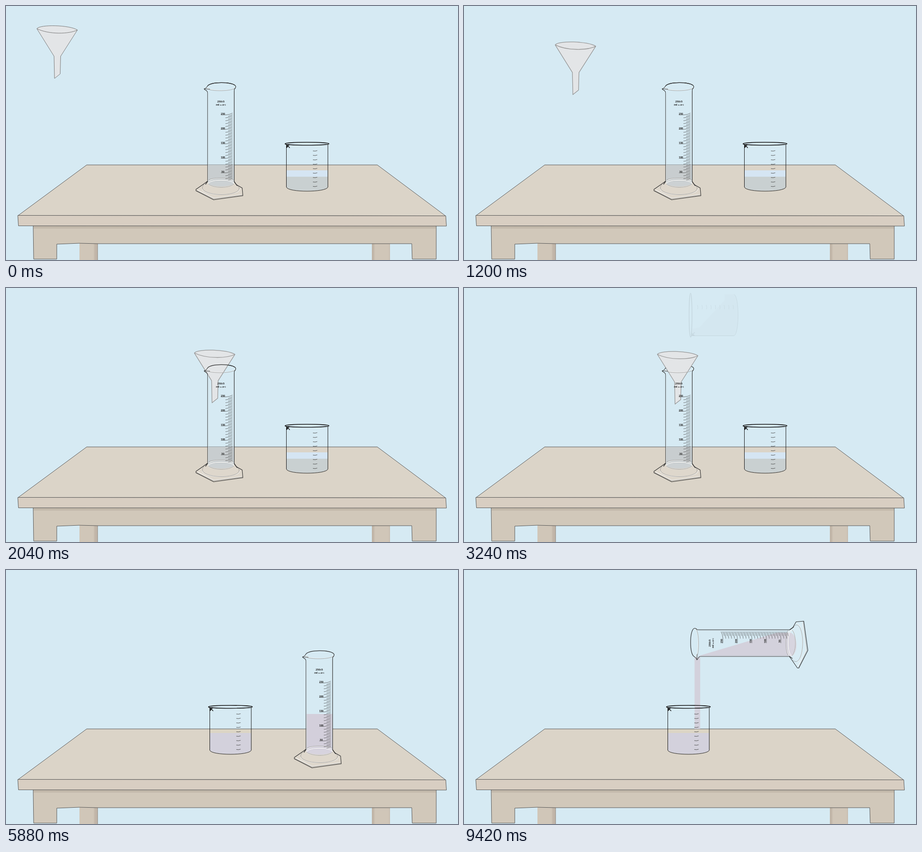
Animation, 997 px wide and 561 px high, one loop 9930 ms. Source, as an HTML page:

```html
<!DOCTYPE html>
<html lang="en">
<head>
<meta charset="utf-8">
<title>Measuring a liquid</title>
<style>
html, body { margin: 0; width: 100%; height: 100%; overflow: hidden; background: #d6eaf3; }
svg { display: block; width: 100vw; height: 100vh; }
text { font-family: "Open Sans", "Noto Sans", sans-serif; font-weight: 700; fill: #222; text-anchor: middle; }
</style>
</head>
<body>
<svg viewBox="0 0 997 561" fill="none" stroke-linejoin="round">
  <defs>
    <path id="arc" d="M445 176C454 167.3 494 167.3 505 175" stroke="#2a2a2a" stroke-width="1.2"/>

    <g id="cylinder">
      <path d="M419 405L437 392L445 388L503.500 388L521 402L522.500 419L458 428L419 408Z" fill="#fff" fill-opacity=".08"/>
      <g stroke="#f4f4f2" stroke-width="1.1">
        <ellipse cx="474.500" cy="392.500" rx="28" ry="8"/>
        <path d="M447 387C455 377.500 494 377.500 502 387M446 391C455 383 494 383 503 391"/>
        <path d="M433 404C434 420 514 421 516 404M423 406.500L458 424.500L519 416.500"/>
        <path d="M441 180C452 188 498 188.500 505 180"/>
      </g>
      <g stroke="#777" stroke-width=".6">
        <path d="M437 394C424 407 446 416 474 416.500S526 407 508 395"/>
        <path d="M446 393C456 403 494 403 503 393M447 384.500C456 378 493 378 502 384.500"/>
        <path d="M420 407.500L458 425.800L521.500 417.500"/>
        <path d="M442 182.500C453 189 499 188.500 505 181"/>
        <path d="M446.500 192V388M501.800 188V388" stroke="#c3ced3"/>
      </g>
      <g stroke="#2a2a2a" stroke-width="1.1">
        <path d="M445 176C443 179.500 441 182.500 437 183C438 186.500 444 185 444.500 191"/>
        <path d="M444.500 191V387" stroke="#444" stroke-width="1"/>
        <path d="M444.500 387L437 392.500L419 405V408L458 428L522.500 419L521 402L508 394.500L503.500 388V184"/>
        <path d="M503.500 184C507 181 508 177.500 505 175"/>
        <path d="M437 183C443 184 448 182.500 450 184" stroke-width=".8"/>
        <path d="M445 387L440 394M503.500 388L510 397" stroke-width="1.300"/>
      </g>
      <path id="scale" stroke="#444" stroke-width=".7"/>
      <g id="labels" font-size="5.500"></g>
      <text x="474" y="213.300" font-size="5.600">250±5</text>
      <text x="474" y="220" font-size="5.200">mℓ <tspan font-size="3.800">in 20°C</tspan></text>
    </g>

    <g id="beaker" stroke="#111">
      <g id="vessel">
        <path d="M618.500 306V400" stroke-width="1"/>
        <path d="M618.500 400C622 412 706 412 710 400" stroke-width=".9"/>
        <ellipse cx="664" cy="304.200" rx="48.500" ry="3.200" stroke-width="1.500"/>
        <path d="M615 304.500L620 307L619.500 312.500L622 309L626 313.500M620 308L625 307" stroke-width="1.300"/>
        <path id="marks" stroke="#444" stroke-width=".9"/>
      </g>
      <path d="M710 306V400" stroke-width="1"/>
    </g>

    <linearGradient id="legL"><stop offset=".76" stop-color="#d0c6b8"/><stop offset=".86" stop-color="#c1b5a8"/></linearGradient>
    <linearGradient id="legR"><stop offset=".08" stop-color="#c0b4a6"/><stop offset=".18" stop-color="#d0c6b8"/><stop offset=".92" stop-color="#d0c6b8"/><stop offset="1" stop-color="#c4b9ab"/></linearGradient>
  </defs>

  <rect width="997" height="561" fill="#d6eaf3"/>

  <g stroke="#555" stroke-width="1">
    <path d="M162 524H202V561H162Z" fill="url(#legL)" stroke="none"/>
    <path d="M807 524H847V561H807Z" fill="url(#legR)" stroke="none"/>
    <path d="M202 525V561" stroke="#8b8178"/>
    <path d="M60 486H949V559H896L895 525H202L162 524L112 526V559H61Z" fill="#d1c8ba"/>
    <path d="M61 486H948V491.500H61Z" fill="#c2b8aa" stroke="none"/>
    <path d="M178 351H819L969.500 463.500L27 462.500Z" fill="#dbd4c8"/>
    <path d="M26 462.500L970 463.500L971.500 486L27.500 485.500Z" fill="#d8cec2"/>
  </g>

  <g id="sceneA">
    <path d="M445.500 351H503V392C495 401 454 401 445.500 392Z" fill="#c8cdcf"/>
    <use href="#arc"/>
    <g id="funnel" fill="#e3e5e7">
      <path d="M68 50C75 40.500 140 41.500 157.500 53L120.500 111L119.500 150L107 160L106 111Z"/>
      <path d="M157.500 53C140 62 95 63.500 68 50" fill="none"/>
    </g>
    <path id="pool" d="M438 165H506L498.500 177H445.500Z" fill="#e3ebe4"/>
    <use href="#cylinder"/>
    <use id="rim" href="#arc"/>
    <path id="drip" d="M465.500 254L475 250V388H465.500Z" fill="#c9d2d3"/>

    <path d="M619 363H709.500V377H619Z" fill="#d5e5f3"/>
    <path d="M619 377H709.500V400C705 411 623 411 619 400Z" fill="#c9d0d1"/>
    <use href="#beaker"/>

    <g id="tilted">
      <path d="M575 14H595C607 20 607 102 595 106H503V90L519 87L575 27Z" fill="#c9d0d2"/>
      <use href="#vessel" stroke="#111" transform="matrix(0 -1 1 0 195.500 724)"/>
    </g>
    <path id="pour" d="M496 105H504V157H496Z" fill="#c9d2d3"/>
  </g>

  <g id="sceneB">
    <path id="stream" d="M508.500 193H521V351H508.500Z" fill="#d3d1dc"/>
    <g transform="translate(-169 -2)">
      <path d="M619 354H710V362H619Z" fill="#dcd5c5"/>
      <path d="M619 362H710V400C705 411 623 411 619 400Z" fill="#d3d1dc"/>
      <use href="#beaker"/>
    </g>
    <g id="filled" transform="translate(217 9)">
      <path d="M445.500 309H503V392C495 401 454 401 445.500 392Z" fill="#d3cfdb"/>
      <use href="#cylinder"/><use href="#arc"/>
    </g>
    <path id="liquid" d="M515 190.500L690 138.500H721C737 146 737 183 723 190.500Z" fill="#d3d1dc"/>
    <g id="lying" transform="matrix(0 -1 1 0 330.500 635.500)">
      <use href="#cylinder"/><use href="#arc"/>
    </g>
  </g>
</svg>
<script>
const LOOP = 9930, STEP = 30;
const el = {};
document.querySelectorAll('[id]').forEach(e => { el[e.id] = e; });

// Graduations of the cylinder, one per 5 ml
let d = '', labels = '';
for (let k = 0; k < 46; k++) {
  const y = 240.5 + k * 3.2;
  const x = k % 10 === 0 ? 474 : k % 2 === 0 ? 484 : 490;
  d += `M${x} ${y}H${Math.max(x, 485)}Q494 ${y - 0.5} 499.5 ${y - 4}`;
  if (k % 10 === 0) labels += `<text x="478.500" y="${y - 1}">${250 - k * 5}</text>`;
}
el.scale.setAttribute('d', d);
el.labels.innerHTML = labels;

d = '';
for (let i = 0; i < 9; i++) d += `M677 ${320 + i * 9.8}q5 1.200 9.500 -.6`;
el.marks.setAttribute('d', d);

const clamp = v => Math.min(1, Math.max(0, v));
const ramp = (t, a, b) => clamp((t - a) / (b - a));
const show = (e, on) => e.setAttribute('visibility', on ? 'visible' : 'hidden');
const fade = (e, v) => e.setAttribute('opacity', v);

// Speeds up over share a, runs evenly, slows down over share b
function glide(u, a, b) {
  const v = 1 / (1 - (a + b) / 2);
  if (u < a) return v * u * u / (2 * a);
  if (u > 1 - b) return 1 - v * (1 - u) ** 2 / (2 * b);
  return v * (u - a / 2);
}

function draw(ms) {
  const t = Math.floor((ms % LOOP) / STEP) * STEP;
  const first = t < 5880;
  el.sceneA.setAttribute('display', first ? 'inline' : 'none');
  el.sceneB.setAttribute('display', first ? 'none' : 'inline');

  if (first) {
    const p = glide(ramp(t, 480, 2265), 0.35, 0.42);
    el.funnel.setAttribute('transform', `translate(${358.5 * p} ${96.5 * p})`);
    el.funnel.setAttribute('stroke', p > 0 ? '#949494' : '#777');
    el.funnel.setAttribute('stroke-width', p > 0 ? 1.3 : 1);
    show(el.rim, t < 2730);
    fade(el.tilted, ramp(t, 3210, 3570));
    fade(el.pour, ramp(t, 4110, 4410));
    fade(el.pool, ramp(t, 4110, 4410));
    fade(el.drip, ramp(t, 5160, 5340));
  } else {
    fade(el.filled, 1 - ramp(t, 6330, 6720));
    fade(el.lying, ramp(t, 7260, 7620));
    fade(el.liquid, ramp(t, 8310, 8520));
    fade(el.stream, ramp(t, 9210, 9420));
  }
}

const start = performance.now();
function tick() {
  draw(performance.now() - start);
  requestAnimationFrame(tick);
}
draw(0);
requestAnimationFrame(tick);
</script>
</body>
</html>
```
